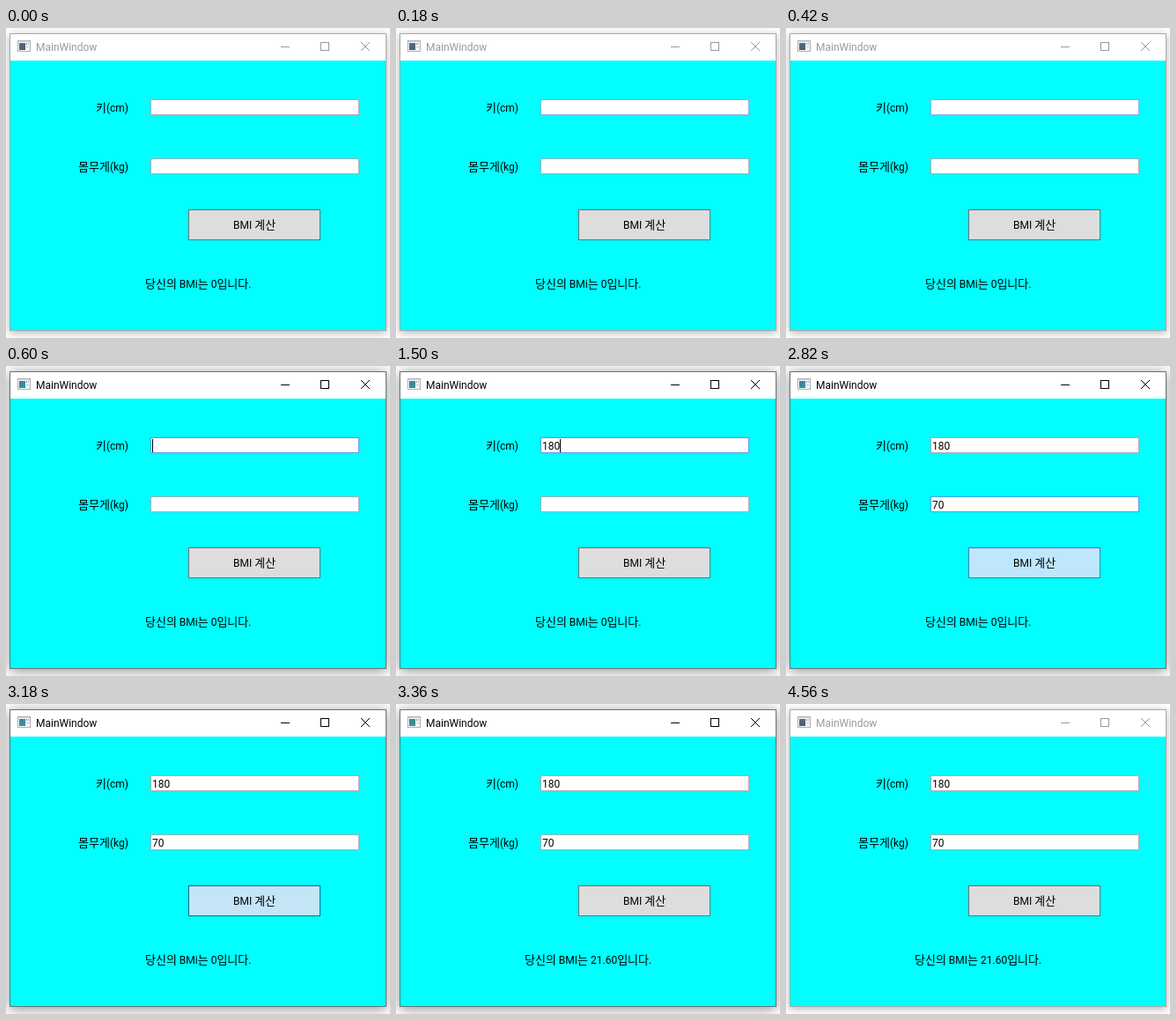
An HTML page with a canvas for the animation above (4.62 s loop, 436x352 px).

```html
<!DOCTYPE html>
<html lang="ko">
<head>
<meta charset="utf-8">
<style>
  html, body { margin: 0; width: 100%; height: 100%; overflow: hidden; background: #fff; }
  canvas { display: block; }
</style>
</head>
<body>
<canvas id="stage" width="436" height="352"></canvas>
<script>
const ctx = document.getElementById('stage').getContext('2d');
const LOOP = 4620;
const LATIN = '12px Roboto, "Open Sans", sans-serif';
const HANGUL = '350 13px "Noto Sans CJK KR", "Noto Sans CJK", sans-serif';
const BORDER = { normal: '#abadb3', hover: '#7eb4ea', focus: '#569de5' };
const BUTTON = {
  normal: ['#dddddd', '#707070'],
  hover: ['#bee6fd', '#3c7fb1'],
  pressed: ['#c4e5f6', '#2c628b']
};

const START = {
  active: false, hover: '', focus: '', caret: false,
  height: '', weight: '', button: 'normal',
  result: '당신의 BMi는 0입니다.'
};

// Each entry changes part of the state from its time on.
const EVENTS = [
  [180, { hover: 'height' }],
  [240, { hover: '' }],
  [420, { hover: 'height' }],
  [600, { active: true, focus: 'height', caret: true }],
  [1140, { caret: false }],
  [1260, { height: '1', caret: true }],
  [1380, { height: '18' }],
  [1500, { height: '180' }],
  [1800, { focus: 'weight' }],
  [2100, { weight: '7' }],
  [2160, { weight: '70' }],
  [2580, { hover: '' }],
  [2700, { caret: false }],
  [2820, { button: 'hover' }],
  [3180, { button: 'pressed', focus: '' }],
  [3240, { button: 'hover', result: '당신의 BMI는 21.60입니다.' }],
  [3360, { button: 'normal' }],
  [4560, { active: false }]
];

function stateAt(time) {
  const state = { ...START };
  for (const [at, change] of EVENTS) if (time >= at) Object.assign(state, change);
  return state;
}

function rect(x, y, w, h, color) {
  ctx.fillStyle = color;
  ctx.fillRect(x, y, w, h);
}

function framed(x, y, w, h, fill, border) {
  rect(x, y, w, h, border);
  rect(x + 1, y + 1, w - 2, h - 2, fill);
}

// Draws mixed Hangul and Latin text; align is 0 for left, 0.5 for centre, 1 for right.
function text(str, x, baseline, align = 0, color = '#000') {
  const runs = str.match(/[가-힣]+|[^가-힣]+/g) || [];
  const parts = runs.map(run => {
    const font = /[가-힣]/.test(run) ? HANGUL : LATIN;
    ctx.font = font;
    return { run, font, width: ctx.measureText(run).width };
  });
  const total = parts.reduce((sum, part) => sum + part.width, 0);
  let pen = Math.round(x - total * align);
  ctx.fillStyle = color;
  for (const part of parts) {
    ctx.font = part.font;
    ctx.fillText(part.run, pen, baseline);
    pen += part.width;
  }
  return pen;
}

function drawIcon(active) {
  framed(13, 14, 15, 13, '#f4f5f7', active ? '#a9b3ba' : '#b0b0b8');
  rect(14, 15, 13, 1, '#cfd5da');
  const panel = ctx.createLinearGradient(15, 17, 22, 25);
  panel.addColorStop(0, active ? '#3f7f9d' : '#5c6c84');
  panel.addColorStop(1, active ? '#2f9a94' : '#4b5b70');
  rect(15, 17, 7, 8, panel);
  rect(23, 17, 1, 2, '#8a98b8');
  rect(25, 17, 1, 2, '#c9a4ae');
  rect(23, 21, 3, 1, '#c4cad2');
}

function drawCaptionButtons(color) {
  rect(312, 21, 10, 1, color);
  ctx.strokeStyle = color;
  ctx.lineWidth = 1;
  ctx.strokeRect(357.5, 16.5, 9, 9);
  ctx.beginPath();
  ctx.moveTo(403, 16);
  ctx.lineTo(413, 26);
  ctx.moveTo(413, 16);
  ctx.lineTo(403, 26);
  ctx.stroke();
}

function drawWindow(active) {
  rect(0, 0, 436, 352, '#fff');
  ctx.save();
  ctx.shadowColor = active ? 'rgba(0,0,0,.45)' : 'rgba(0,0,0,.3)';
  ctx.shadowBlur = active ? 14 : 9;
  ctx.shadowOffsetY = 2;
  rect(4, 6, 428, 338, '#fff');
  ctx.restore();
  framed(4, 6, 428, 338, '#fff', active ? '#687474' : '#a6aaaa');
  rect(5, 37, 426, 306, '#00ffff');
  const ink = active ? '#000' : '#999';
  drawIcon(active);
  text('MainWindow', 34, 26, 0, ink);
  drawCaptionButtons(ink);
}

function drawField(state, name, label, y) {
  const mode = state.focus === name ? 'focus' : state.hover === name ? 'hover' : 'normal';
  text(label, 139, y + 14, 1);
  framed(164, y, 237, 18, '#fff', BORDER[mode]);
  const end = text(state[name], 166, y + 14);
  if (state.caret && state.focus === name) rect(Math.floor(end), y + 2, 1, 15, '#000');
}

function draw(time) {
  const state = stateAt(time);
  drawWindow(state.active);
  drawField(state, 'height', '키(cm)', 81);
  drawField(state, 'weight', '몸무게(kg)', 148);
  framed(207, 206, 150, 35, ...BUTTON[state.button]);
  text('BMI 계산', 282, 228, 0.5);
  text(state.result, 218, 295, 0.5);
}

const begin = performance.now();
function tick() {
  draw((performance.now() - begin) % LOOP);
  requestAnimationFrame(tick);
}
tick();
</script>
</body>
</html>
```
